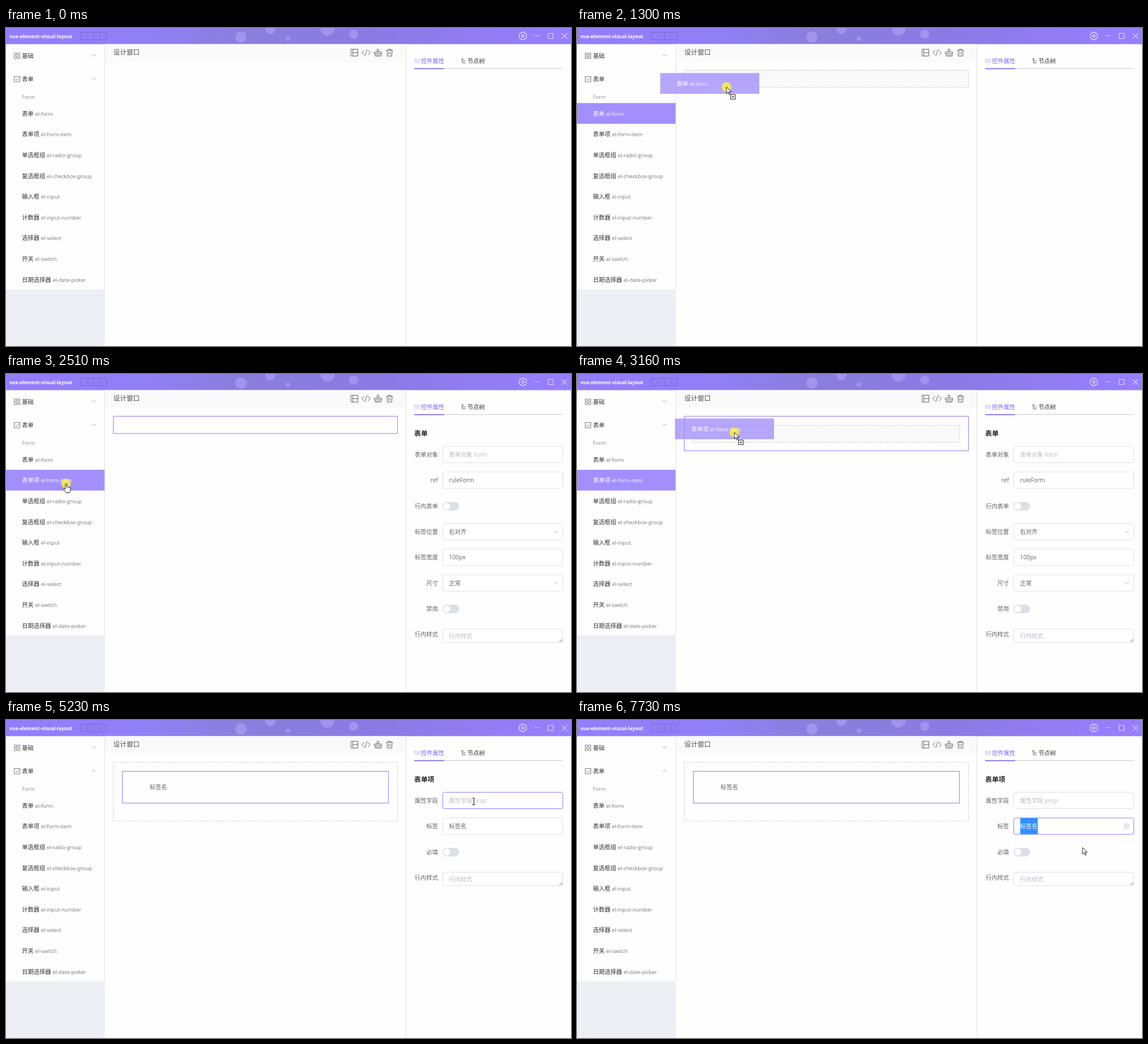
Write an HTML page that moves like this. It is 998 px wide and 561 px high and loops after 8000 ms.

```html
<!DOCTYPE html>
<html lang="zh">
<head>
<meta charset="utf-8">
<style>
  html, body { margin: 0; width: 100%; height: 100%; overflow: hidden; background: #fefefe; }
  svg { display: block; width: 100vw; height: 100vh; }
  text { font-family: 'Open Sans', 'Noto Sans CJK SC', 'Noto Sans CJK', sans-serif; white-space: pre; }
  .line { fill: none; stroke-width: 1; }
</style>
</head>
<body>
<svg viewBox="0 0 998 561">
  <defs>
    <linearGradient id="bar">
      <stop offset="0" stop-color="#937efe"/>
      <stop offset=".25" stop-color="#917ff6"/>
      <stop offset=".42" stop-color="#8b7edc"/>
      <stop offset=".65" stop-color="#8b7ae4"/>
      <stop offset="1" stop-color="#977fff"/>
    </linearGradient>
    <clipPath id="barClip"><path d="M0 0H998V28.5H0z"/></clipPath>
  </defs>
  <g id="base"></g>
  <g id="scene"></g>
</svg>
<script>
const LOOP = 8000, STEP = 108, BLINK = 540;
const PURPLE = '#7f63f4', OUTLINE = '#917ff6', ROW_FILL = '#a28ffc';
const BORDER = '#dcdfe6', HOVER = '#b9bdc6', HINT = '#b6bac3';
const EM = 10.25, ROW_TOP = 132.4, ROW_H = 36.6, FIELD_GAP = 45.35;

const ROWS = [
  ['表单', 'el-form'], ['表单项', 'el-form-item'], ['单选框组', 'el-radio-group'],
  ['复选框组', 'el-checkbox-group'], ['输入框', 'el-input'], ['计数器', 'el-input-number'],
  ['选择器', 'el-select'], ['开关', 'el-switch'], ['日期选择器', 'el-date-picker']
];
const FORM_PROPS = [
  ['表单对象', 'hint', '表单对象 form'], ['ref', 'input', 'ruleForm'], ['行内表单', 'switch'],
  ['标签位置', 'select', '右对齐'], ['标签宽度', 'input', '100px'], ['尺寸', 'select', '正常'],
  ['禁用', 'switch'], ['行内样式', 'area', '行内样式']
];
const ITEM_PROPS = [
  ['属性字段', 'hint', '属性字段 prop'], ['标签', 'input', '标签名'],
  ['必填', 'switch'], ['行内样式', 'area', '行内样式']
];

const AT = {
  enter: 310, grabForm: 980, dropForm: 1400, grabItem: 2510, openSlot: 2940, dropItem: 3460,
  clickProp: 4670, clickLabel: 6300, grabText: 6970, select: 7190, dropText: 7510
};
const ENTRY = [262, 247];
// Pointer glides: start, end, x, y
const GLIDES = [
  [AT.enter, 870, 118, 157],
  [AT.grabForm, 1300, 264, 104],
  [AT.dropForm, 1610, 222, 190],
  [1610, 1940, 68, 190],
  [2060, 2290, 106, 193],
  [AT.grabItem, 3160, 278, 103],
  [3360, 4010, 829, 186],
  [4010, 4120, 827, 162],
  [4240, 4330, 826, 143],
  [6090, AT.clickLabel, 833, 188],
  [AT.select, 7410, 783, 188],
  [AT.dropText, 7730, 893, 225]
];

const within = (t, a, b) => t >= a && t < b;
const fieldY = i => 142 + i * FIELD_GAP;

const text = (x, y, str, fill = '#606266', size = EM, extra = '') =>
  `<text x="${x}" y="${y}" fill="${fill}" font-size="${size}" ${extra}>${str}</text>`;
const fillRect = (x, y, w, h, fill, extra = '') =>
  `<rect x="${x}" y="${y}" width="${w}" height="${h}" fill="${fill}" ${extra}/>`;
const frame = (x, y, w, h, stroke) => fillRect(x, y, w, h, 'none', `stroke="${stroke}"`);
const dashed = (x, y, w, h, fill = 'none') =>
  fillRect(x, y, w, h, fill, 'stroke="#c8c8c8" stroke-dasharray="2.4 1.6"');
const line = (d, stroke, extra = '') => `<path class="line" d="${d}" stroke="${stroke}" ${extra}/>`;
const dot = (x, y, r, fill, extra = '') => `<circle cx="${x}" cy="${y}" r="${r}" fill="${fill}" ${extra}/>`;

function rowLabel([name, tag], x, y, light) {
  const dim = light ? '#fff' : '#757575';
  return text(x, y, `${name} <tspan font-size="9.3" fill="${dim}">${tag}</tspan>`, light ? '#fff' : '#303133');
}

function gear(cx, cy) {
  let d = '';
  for (let i = 0; i < 18; i++) {
    const angle = (Math.floor(i / 3) * 60 + [-17, 17, 30][i % 3]) * Math.PI / 180;
    const r = i % 3 === 2 ? 5.4 : 7;
    d += `${i ? 'L' : 'M'}${(cx + r * Math.sin(angle)).toFixed(1)} ${(cy - r * Math.cos(angle)).toFixed(1)}`;
  }
  return line(d + 'z', '#fff') + dot(cx, cy, 2.2, 'none', 'stroke="#fff"');
}

function header() {
  const bubbles = [[415, 16, 10], [467, 2, 9], [498, 19, 4], [568, 1, 12.5], [614, 11, 8]];
  return fillRect(0, 0, 998, 28.5, 'url(#bar)') +
    `<g clip-path="url(#barClip)">${bubbles.map(b => dot(...b, '#b9aaff', 'opacity=".5"')).join('')}</g>` +
    text(6, 17.5, 'vue-element-visual-layout', '#fff', 8.5, 'font-weight="700"') +
    frame(131.5, 7.5, 46, 13, '#7969cc') +
    line('M154.5 8v12M145.5 10.5l-3.5 3.5 3.5 3.5M164 10.5l3.5 3.5-3.5 3.5', '#7969cc') +
    gear(913, 14) + line('M933 13.5h9', '#cfc4ff') + frame(957.5, 9.5, 9, 9, '#e4dcff') +
    line('M981.5 9.5l10 9.5M991.5 9.5l-10 9.5', '#fff');
}

function sidebar() {
  const icon = '#808080';
  return fillRect(0, 461, 174.5, 100, '#edeff5') + line('M174.5 28.5V461', '#e2e4ea') +
    line('M14.5 44h4v4h-4zm6 0h4v4h-4zm-6 6h4v4h-4zm6 0h4v4h-4z', icon) +
    text(28.3, 52.5, '基础', '#303133') + line('M151.5 46.5l3.5 3.3 3.5-3.3', '#aaa') +
    frame(14.5, 85.5, 10, 9.5, icon) + line('M16.8 90l2.2 2.4 4.5-5', icon) +
    text(28.3, 93.6, '表单', '#303133') + line('M151.5 91.2l3.5-3.3 3.5 3.3', '#aaa') +
    text(28.3, 125.2, 'Form', '#8a8a8a', 9.1) +
    ROWS.map((row, i) => rowLabel(row, 28.3, 154.8 + i * ROW_H)).join('');
}

function toolbar() {
  const ink = '#666';
  return fillRect(175, 28.5, 531, 31.5, '#fafafa') + text(189.5, 47.3, '设计窗口', '#4a4a4a', 11.7) +
    line('M609.5 37.5h12v12h-12zM612.5 37.5v12M612.5 43.5h9', ink) +
    line('M632.5 39l-4 4.3 4 4.3M639.5 39l4 4.3-4 4.3M637.8 37.5l-3.8 11.5', ink) +
    line('M650.5 42.5h13v3h-13zM652 45.5v4h10.5v-4M655.5 42.5v-5h3v5M655.5 47v2.5M659 47v2.5', ink) +
    line('M671.5 39.5h12M675 39.5v-2h5v2M673 39.5l.5 10h8l.5-10M676 42v5M679 42v5', ink);
}

function tabs() {
  return line('M706.5 28.5V561', '#dfe1e8') + line('M721 71.5H984', '#c9cbd0') +
    fillRect(721, 70.8, 53, 1.7, PURPLE) +
    line('M722.5 54v8M726 54v8M729.5 54v8M721.5 56h2M725 59.5h2M728.5 56.5h2', PURPLE, 'opacity=".5"') +
    text(733, 61.8, '控件属性', PURPLE) +
    line('M804 54.5h4.5M806 54.5v7h6M806 58h6', '#666') + text(815, 61.8, '节点树', '#303133');
}

// Eased glide, shown in whole steps
function pointer(t) {
  let [x, y] = ENTRY;
  for (const [start, end, toX, toY] of GLIDES) {
    if (t < start) break;
    const steps = Math.round((end - start) / STEP);
    const k = Math.min(1, Math.floor((t - start) / (end - start) * steps + .2) / steps);
    const ease = k * k * (3 - 2 * k);
    x += (toX - x) * ease;
    y += (toY - y) * ease;
  }
  return { x, y };
}

function fieldUnder({ x, y }) {
  return within(x, 771, 984) ? [0, 1].find(i => Math.abs(y - fieldY(i)) < 15) : undefined;
}

function property([label, kind, value], i, stroke) {
  const y = fieldY(i);
  const name = text(763, y + 3.9, label, '#606266', EM, 'text-anchor="end"');
  if (kind === 'switch') {
    return name + fillRect(771, y - 7, 29.5, 15, '#dcdfe6', 'rx="7.5"') + dot(778.6, y + .5, 6, '#fff');
  }
  const area = kind === 'area';
  let out = name +
    fillRect(771.5, y - (area ? 9.3 : 14.5), 212, area ? 23.5 : 29, '#fff', `rx="2.8" stroke="${stroke}"`) +
    text(782.6, y + (area ? 6.6 : 3.9), value, area || kind === 'hint' ? HINT : '#606266');
  if (kind === 'select') out += line(`M967.5 ${y - 1.5}l3.7 3.6 3.7-3.6`, HINT);
  if (area) out += line(`M977.5 ${y + 13}l5-5M980.5 ${y + 13}l2-2`, '#777');
  return out;
}

function panel(t) {
  if (t < AT.dropForm) return '';
  const item = t >= AT.dropItem;
  const focus = t < AT.clickProp + STEP ? -1 : t < AT.clickLabel + 100 ? 0 : 1;
  const hovered = [fieldUnder(pointer(t)), fieldUnder(pointer(t - 120))];
  const stroke = i => i === focus ? OUTLINE : hovered.includes(i) ? HOVER : BORDER;
  let out = text(721, 109, item ? '表单项' : '表单', '#222', 11.9, 'font-weight="700"') +
    (item ? ITEM_PROPS : FORM_PROPS).map((p, i) => property(p, i, stroke(i))).join('');
  if (focus === 1 || (focus === 0 && hovered.includes(1))) {
    out += dot(971, 187.2, 4, 'none', `stroke="${HINT}"`) + line('M969.5 185.7l3 3M972.5 185.7l-3 3', HINT);
  }
  return out + (t < AT.select ? caret(t) : selection(t));
}

function caret(t) {
  const since = [AT.grabText, AT.clickLabel, AT.clickProp].find(start => t >= start);
  if (!since || Math.floor((t - since) / BLINK) % 2) return '';
  return since === AT.clickProp ? line('M783.5 134.5v14.5', '#333') : line('M814.3 180v14', '#333');
}

function selection(t) {
  const right = 814, x = pointer(Math.min(t, AT.dropText)).x;
  const count = Math.max(0, Math.min(3, Math.round((right - x) / EM)));
  const left = right - count * EM;
  return fillRect(left - .2, 173, count * EM, 28.5, '#3390ff') +
    text(left - .6, 191.2, '标签名'.slice(3 - count), '#fff');
}

function canvasArea(t) {
  if (t < AT.grabForm + STEP) return '';
  if (t < AT.dropForm) return dashed(189.5, 74.5, 502, 30.5, '#f9f9f9');
  if (t < AT.openSlot) return frame(189.5, 74.5, 502, 30.5, OUTLINE);
  if (t < AT.dropItem) return frame(189.5, 74.5, 502, 61, OUTLINE) + dashed(204.5, 90.5, 471.5, 30, '#f9f9f9');
  return dashed(189.5, 74.5, 502, 103.7) + frame(205.5, 90.5, 470, 56, OUTLINE) + text(253.7, 122.2, '标签名');
}

function cursor(kind, x, y) {
  const solid = d => `<path d="${d}" fill="#fff" stroke="#222" stroke-linejoin="round"/>`;
  const arrow = solid('M0 0v11.5l2.7-2.5 2 4.5 1.8-.8-2-4.3h3.7z');
  const shapes = {
    arrow,
    copy: arrow + fillRect(7.5, 13.5, 8, 8, '#fff', 'stroke="#222"') + line('M11.5 15.5v4M9.5 17.5h4', '#222'),
    hand: solid('M-1 10V1q1.2-1.8 2.4 0v5l4.8 1.2q2 .6 1.8 2.6l-.6 3.7-1.2 3h-5.7l-4-5.3q-1.4-2 .3-2.4z'),
    beam: line('M-2.5-5h5M0-5v11.5M-2.5 6.5h5', '#222', 'stroke-width="1.2"')
  };
  return `<g transform="translate(${x.toFixed(1)} ${y.toFixed(1)})">${shapes[kind]}</g>`;
}

function pointerLayer(t) {
  if (t < AT.enter) return '';
  const { x, y } = pointer(t);
  const held = within(t, AT.grabForm, AT.dropForm) ? 0 : within(t, AT.grabItem, AT.dropItem) ? 1 : -1;
  const overList = x < 174 && y > ROW_TOP;
  const row = held >= 0 ? held : overList ? Math.floor((y - ROW_TOP) / ROW_H) : -1;
  const dragging = held >= 0 && t >= [AT.grabForm, AT.grabItem][held] + STEP;
  const pressed = held >= 0 || within(t, AT.grabText, AT.dropText) ||
    [AT.clickProp, AT.clickLabel].some(start => within(t, start, start + 2 * STEP));
  let out = '';
  if (row >= 0) {
    out += fillRect(0, ROW_TOP + row * ROW_H, 174, ROW_H, ROW_FILL) +
      rowLabel(ROWS[row], 28.3, 154.8 + row * ROW_H, true);
  }
  if (dragging) {
    const left = x - [117, 105][held], top = y - 24.5;
    out += `<g opacity=".78">${fillRect(left, top, 175, ROW_H, ROW_FILL)}` +
      rowLabel(ROWS[held], left + 28.8, top + 22.4, true) + '</g>';
  }
  if (pressed) out += dot(x, y, 8.6, '#fff53c', 'opacity=".8"');
  const kind = dragging ? 'copy' : overList ? 'hand' : fieldUnder({ x, y }) !== undefined ? 'beam' : 'arrow';
  return out + cursor(kind, x, y);
}

document.getElementById('base').innerHTML = header() + sidebar() + toolbar() + tabs();
const scene = document.getElementById('scene');
let shown;
function tick() {
  const t = performance.now() % LOOP;
  const markup = canvasArea(t) + panel(t) + pointerLayer(t);
  if (markup !== shown) scene.innerHTML = shown = markup;
  requestAnimationFrame(tick);
}
tick();
</script>
</body>
</html>
```
